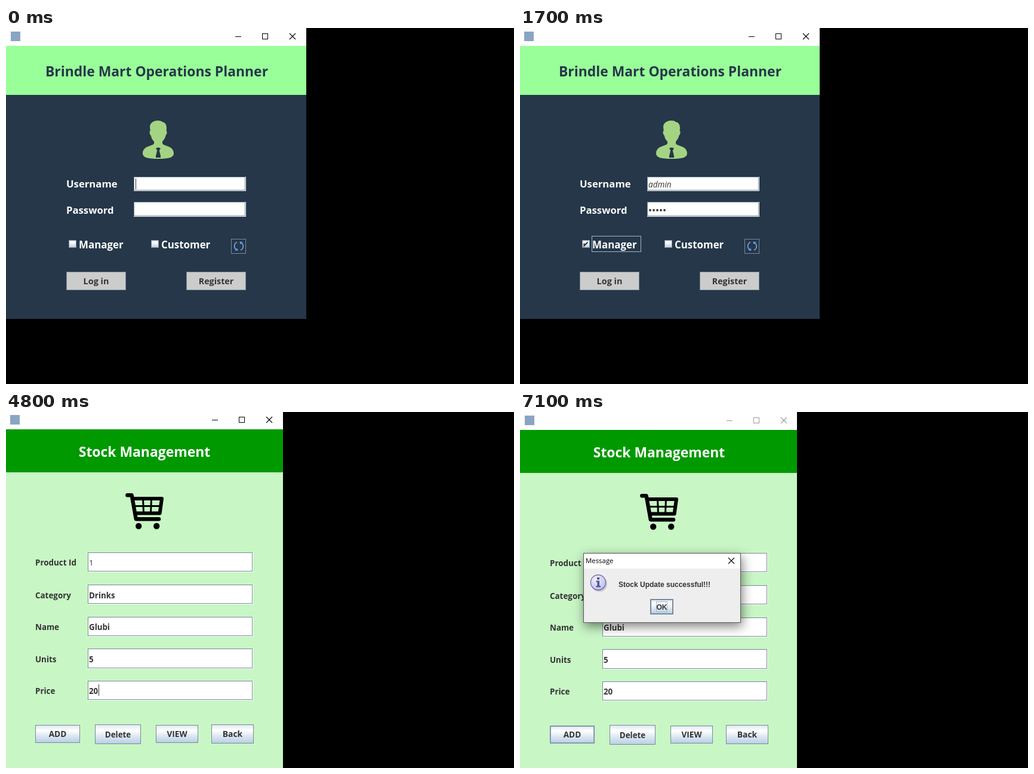
An HTML page that plays this animation: 851 px wide and 596 px high, repeating every 8000 ms.

```html
<!DOCTYPE html>
<html lang="en">
<head>
<meta charset="utf-8">
<title>Shop desk demo</title>
<style>
html, body { margin: 0; width: 100%; height: 100%; overflow: hidden; background: #000; }
svg { display: block; width: 851px; height: 596px; }
text { font-family: "Open Sans", "Noto Sans", sans-serif; font-weight: 700; white-space: pre; }
.arial { font-family: "Liberation Sans", Arial, sans-serif; }
</style>
</head>
<body>
<svg id="stage" viewBox="0 0 851 596" xmlns="http://www.w3.org/2000/svg"></svg>
<script>
const LOOP = 8000;
const NAVY = '#253749', INK = '#333', EDGE = '#7a8a99', FOCUS = '#a3b8cc';

const rect = (x, y, w, h, fill, extra = '') =>
  `<rect x="${x}" y="${y}" width="${w}" height="${h}" fill="${fill}" ${extra}/>`;

const frame = (x, y, w, h, fill, stroke = EDGE) =>
  rect(x + .5, y + .5, w - 1, h - 1, fill, `stroke="${stroke}"`);

const path = (d, stroke, width, extra = '') =>
  `<path d="${d}" fill="none" stroke="${stroke}" stroke-width="${width}" ${extra}/>`;

const text = (s, x, y, size, fill = INK, extra = '') =>
  `<text x="${x}" y="${y}" font-size="${size}" fill="${fill}" ${extra}>${s}</text>`;

const mid = (s, x, y, size, fill, extra = '') =>
  text(s, x, y, size, fill, 'text-anchor="middle" ' + extra);

const group = (inner, dx = 0, dy = 0, extra = '') =>
  `<g transform="translate(${dx} ${dy})" ${extra}>${inner}</g>`;

const cross = (x, y, color) =>
  path(`M${x} ${y}l10 10m0 -10l-10 10`, color, 1.1);

// x is the left end of the minimise line
const titleBar = (w, x, color = '#000') =>
  rect(0, 0, w, 30, '#fff') +
  rect(8, 6, 16, 16, '#8aa5c4') +
  rect(x, 14, 10, 1, color) +
  frame(x + 45, 9, 10, 10, 'none', color) +
  cross(x + 91, 9, color);

const field = (x, y, w, h) =>
  rect(x, y, w, h, '#fff') + frame(x, y, w - 1, h - 1, '#fff');

const button = (x, y, w, h, label, size, fill = 'url(#metal)') =>
  frame(x, y, w, h, fill) +
  mid(label, x + w / 2, y + h / 2 + size * .38, size, INK);

const person =
  `<path fill="#a4d483" d="M241 166C241 159 247 155 254 155C259 155 261 156 262 157.5
    C267 158 269 162 269 168L268.5 172C270 172 270 178 267.5 180C266.5 185 263.5 188 262 190
    V193C262 198 281 196 281 210C281 217 272 219 255 219C238 219 229 217 229 210
    C229 196 248 198 248 193V190C246 188 243.5 185 242.8 180C240 178 240 172 241.8 172Z"/>
  <path fill="${NAVY}" d="M251 201.5Q255 198.5 259 201.5L256.8 205L259 214V217H251V214L253.2 205Z"/>`;

const checkbox = (x, y, label) =>
  frame(x, y, 13, 13, 'url(#metal)') + text(label, x + 17, y + 14, 16.9, '#fff');

const refresh =
  frame(377, 353, 25, 25, NAVY) +
  path('M387 358.5A7.2 7.2 0 0 0 386 371.2M393 372A7.2 7.2 0 0 0 394 359.4', '#6f9fe0', 1.8) +
  '<path fill="#6f9fe0" d="M383.6 372.6L388.6 372.8L387.4 368.4ZM396.4 358L391.4 357.8L392.6 362.2Z"/>';

const login = filled => {
  let s = titleBar(503, 384) +
    rect(0, 30, 503, 82, '#99ff99') +
    rect(0, 112, 503, 375, NAVY) +
    mid('Brindle Mart Operations Planner', 252.5, 81, 22.9, NAVY) +
    person +
    text('Username', 101, 267, 16.7, '#fff') + field(214, 249, 188, 24) +
    text('Password', 101, 311, 16.7, '#fff') + field(214, 291, 188, 25) +
    checkbox(105, 355, 'Manager') + checkbox(243, 355, 'Customer') + refresh +
    button(101, 408, 100, 31, 'Log in', 14.4, '#ccc') +
    button(302, 408, 100, 31, 'Register', 14.3, '#ccc');
  if (!filled) return s + rect(217, 252, 1, 18, INK);
  s += text('admin', 216, 267, 13.6, INK, 'style="font-weight:400;font-style:italic"');
  for (let i = 0; i < 5; i++) s += `<circle cx="${219 + i * 6}" cy="305" r="1.9" fill="${INK}"/>`;
  return s + frame(121, 348, 83, 27, 'none', FOCUS) +
    path('M108.5 360.5V364.5L114.5 358.5', INK, 2);
};

const handshake = () => {
  let s = 'M172 122L189 126.3H222M172 165.5L180 167' +
    'M269 122.8L254 125.3C249 126 246 119 239 119Q236 119 233 120.5' +
    'L199 136.5C195 138.5 194.5 142 198 144.5C203 149.5 211 149.5 217 147.5L232 142L257 167.5L269 166' +
    'M257 167.5C262 173 257 180 250.5 179C252 186 245 190 239.5 187.5' +
    'C240 195 233 198 228 194.5C228 205 217 208 212 199' +
    'M247 176L250.5 179M236 184.5L239.5 187.5M225 192L228 194.5';
  s = path(s, '#000', 3.8, 'stroke-linecap="round" stroke-linejoin="round"');
  for (let i = 0; i < 4; i++) {
    const x = 187 + i * 7.7, y = 168.5 + i * 7.9;
    s += `<ellipse cx="${x}" cy="${y}" rx="5.6" ry="7.2" transform="rotate(32 ${x} ${y})"
      fill="#ccffcc" stroke="#000" stroke-width="3.6"/>`;
  }
  return s;
};

const welcome = () =>
  titleBar(428, 309) +
  rect(0, 30, 428, 433, '#ccffcc') +
  mid('WELCOME Admin', 214.5, 91, 23.3, INK) +
  handshake() +
  button(100, 260, 233, 35, '', 17) +
  frame(133, 264, 167, 27, 'none', FOCUS) +
  mid('Stock Management', 216.5, 285, 17.1, INK) +
  button(100, 325, 233, 35, 'Sales Information', 17) +
  button(173, 401, 84, 27, 'Logout', 14.4, '#ffcccc');

const cart =
  path('M204.3 140.3H211.6L218.8 180.3H257', '#000', 6.4, 'stroke-linecap="round" stroke-linejoin="round"') +
  path('M213 146H262L258.6 170.5H217', '#000', 6, 'stroke-linejoin="round"') +
  path('M215 158.5H260M230.5 146L231.5 170M244.5 146L243.5 170', '#000', 3) +
  '<circle cx="223.2" cy="192" r="5.2"/><circle cx="253.2" cy="192" r="5.2"/>';

const rows = [
  ['Product Id', '1', 236, 33], ['Category', 'Drinks', 290, 33], ['Name', 'Glubi', 344, 33],
  ['Units', '5', 397, 34], ['Price', '20', 451, 33]
];

const stock = done => {
  let s = titleBar(466, 346, done ? '#999' : '#000') +
    rect(0, 30, 466, 72, '#009900') +
    rect(0, 102, 466, 496, '#c8f6c5') +
    mid('Stock Management', 233, 76, 22.9, '#fff') + cart;
  rows.forEach(([label, value, y, h], i) => {
    const base = y + (i == 1 || i == 3 ? 23 : 22);
    s += text(label, 50, base, 13.4) + field(138, y, 277, h) +
      text(value, 140, base, 13.3, INK, i ? '' : 'style="font-weight:400"');
  });
  s += button(50, 525, 75, 30, 'ADD', 13.6) +
    button(150, 524, 77, 33, 'Delete', 13.4) +
    button(252, 525, 71, 30, 'VIEW', 13.6) +
    button(345, 524, 71, 32, 'Back', 13.9);
  return s + (done ? frame(51, 526, 73, 28, 'none', '#8ea6d2') : rect(156, 457, 1, 19, INK));
};

const dialog =
  rect(106, 236, 264, 117, '#eee', 'filter="url(#shade)"') +
  frame(106, 236, 264, 117, '#eee', '#555') +
  rect(107, 237, 262, 25, '#fff') +
  text('Message', 110, 253, 11.4, '#000', 'style="font-weight:400"') +
  cross(349, 244, '#000') +
  '<circle cx="133" cy="288" r="13" fill="#999" opacity=".45"/>' +
  '<circle cx="131" cy="285.3" r="12.6" fill="url(#orb)" stroke="#666699" stroke-width="1.2"/>' +
  '<path fill="#555588" d="M129 277h4v3.5h-4zM127.5 282.5h5.5v8.5h2v2.2h-7.5v-2.2h2v-6.3h-2z"/>' +
  text('Stock Update successful!!!', 165, 293, 12, INK, 'class="arial"') +
  rect(219, 314, 37, 24, 'url(#metal)', `stroke="${EDGE}" stroke-width="2"`) +
  frame(228, 317, 19, 18, 'none', FOCUS) +
  mid('OK', 237.5, 331, 12, INK, 'class="arial"');

const defs = `<defs>
  <linearGradient id="metal" x2="0" y2="1">
    <stop offset="0" stop-color="#dde8f3"/><stop offset=".3" stop-color="#fff"/>
    <stop offset=".6" stop-color="#dde8f3"/><stop offset="1" stop-color="#b8cfe5"/>
  </linearGradient>
  <radialGradient id="orb" cx=".35" cy=".3" r=".8">
    <stop offset="0" stop-color="#f0f0ff"/><stop offset="1" stop-color="#b8b8f5"/>
  </radialGradient>
  <filter id="shade" x="-20%" y="-30%" width="140%" height="170%">
    <feDropShadow dx="2" dy="6" stdDeviation="9" flood-opacity=".5"/>
  </filter>
  <clipPath id="page"><rect width="464" height="596"/></clipPath>
</defs>`;

const scenes = [
  [0, login(false)],
  [500, group(login(true), -1)],
  [2500, welcome()],
  [4800, group(stock(false), -1, -1)],
  [7100, stock(true) + dialog]
];

const stage = document.getElementById('stage');
stage.innerHTML = defs + rect(0, 0, 851, 596, '#000') +
  scenes.map(([at, art]) => `<g class="scene" ${at >= 4800 ? 'clip-path="url(#page)"' : ''}>${art}</g>`).join('');
const layers = [...stage.querySelectorAll('.scene')];

function draw(t) {
  let now = 0;
  scenes.forEach(([at], i) => { if (t >= at) now = i; });
  layers.forEach((g, i) => g.setAttribute('display', i == now ? 'inline' : 'none'));
}

const start = performance.now();
function tick() {
  draw((performance.now() - start) % LOOP);
  requestAnimationFrame(tick);
}
tick();
</script>
</body>
</html>
```
